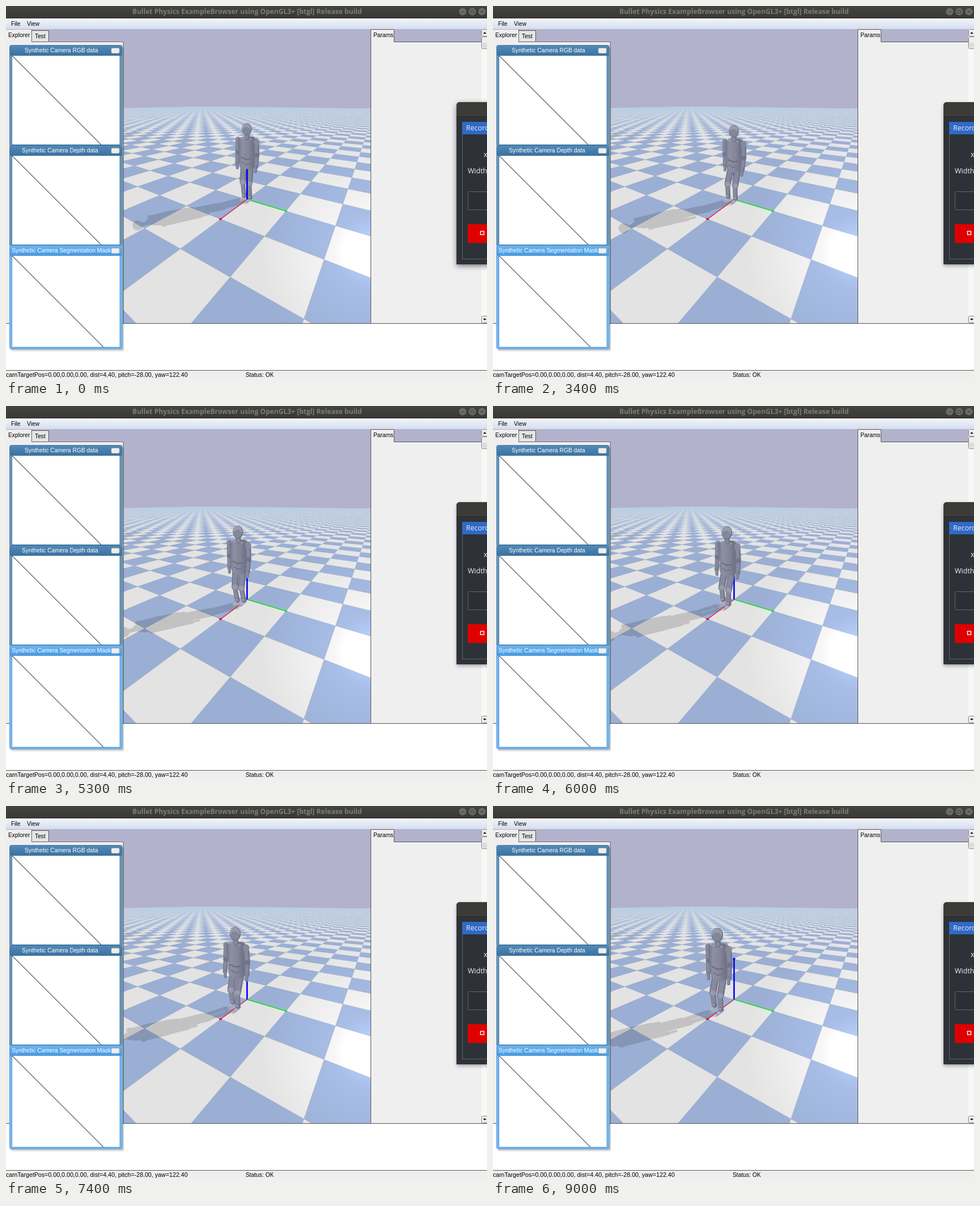
Write an HTML page with a canvas that moves like this. It is 851 px wide and 658 px high and loops after 10 s.

```html
<!DOCTYPE html>
<html lang="en">
<head>
<meta charset="utf-8">
<title>Walking robot</title>
<style>
html, body { margin: 0; width: 100%; height: 100%; overflow: hidden; background: #fff; }
#stage { position: relative; width: 851px; height: 658px; overflow: hidden; }
canvas, svg { position: absolute; left: 0; top: 0; display: block; }
svg text { font: 10.3px "Liberation Sans", Arial, sans-serif; fill: #000; white-space: pre; }
svg .light { fill: #fff; }
svg .title { font: bold 12.1px "Open Sans", "Noto Sans", sans-serif; fill: #807d77; }
#rec { position: absolute; left: 797px; top: 170px; width: 90px; height: 287px; border-radius: 6px 6px 0 0; background: #2e3238; }
#rec svg text { font: 12.5px "Open Sans", "Noto Sans", sans-serif; fill: #eee; }
</style>
</head>
<body>
<div id="stage">
<canvas id="view" width="851" height="658"></canvas>
<svg width="851" height="658">
  <defs>
    <linearGradient id="menu" x2="0" y2="1"><stop stop-color="#f2f5fc"/><stop offset="1" stop-color="#d5dcec"/></linearGradient>
    <linearGradient id="bar" x2="0" y2="1"><stop stop-color="#44433e"/><stop offset="1" stop-color="#393834"/></linearGradient>
    <linearGradient id="dim" x2="0" y2="1"><stop stop-color="#5189b9"/><stop offset="1" stop-color="#3b719f"/></linearGradient>
    <linearGradient id="lit" x2="0" y2="1"><stop stop-color="#6db3ef"/><stop offset="1" stop-color="#4798df"/></linearGradient>
  </defs>
  <rect width="851" height="22" fill="url(#bar)"/>
  <text class="title" x="426.5" y="14" text-anchor="middle">Bullet Physics ExampleBrowser using OpenGL3+ [btgl] Release build</text>
  <g fill="#6d6b66"><circle cx="808" cy="10" r="6.5"/><circle cx="825" cy="10" r="6.5"/><circle cx="842" cy="10" r="6.5"/></g>
  <path d="M805 10.5h6M822.5 7.5h5v5h-5zM839.5 7.5l5 5m0-5l-5 5" fill="none" stroke="#3c3b37"/>
  <rect y="22" width="851" height="19" fill="url(#menu)"/>
  <text x="9" y="35">File</text><text x="37" y="35">View</text>

  <path d="M0 41h45v22h163v498H0z" fill="#eee"/>
  <path d="M45.5 62.5v-19h30v19" fill="#e6e6e6" stroke="#555"/>
  <path d="M0 41.5h45.5v22h162v497" fill="none" stroke="#666"/>
  <path d="M1 42h44M46 64.5h160" stroke="#fff"/>
  <text x="4" y="55">Explorer</text><text x="51" y="57">Test</text>

  <path d="M645 41h41v22h155v498H645z" fill="#efefef"/>
  <path d="M645.5 561V41.5h41v22h155" fill="none" stroke="#555"/>
  <text x="650" y="55">Params</text>
  <rect x="841" y="41" width="10" height="520" fill="#f8f8f8"/>
  <g fill="#eee" stroke="#888"><rect x="841.5" y="41.5" width="12" height="12" rx="2"/><rect x="841.5" y="54.5" width="12" height="21" rx="2"/><rect x="841.5" y="548.5" width="12" height="12" rx="2"/></g>
  <path d="M844 49h6l-3-3zM844 553h6l-3 3z"/>
  <rect x="843" y="65" width="8" height="9" fill="#ddd"/>

  <rect y="561" width="851" height="83" fill="#fff"/>
  <path d="M0 561.5h851" stroke="#555"/>
  <rect y="644" width="851" height="14" fill="#eee"/>
  <path d="M0 644.5h851" stroke="#555"/>
  <text x="0" y="656" style="font-size:10.7px">camTargetPos=0.00,0.00,0.00, dist=4.40, pitch=-28.00, yaw=122.40</text>
  <text x="424" y="656">Status: OK</text>

  <rect x="9" y="73" width="200" height="538" rx="3" fill="#000" opacity=".1"/>
  <rect x="8" y="72" width="200" height="537" rx="3" fill="#000" opacity=".12"/>
  <g id="panels"></g>
</svg>
<div id="rec"><svg width="90" height="287">
  <path d="M0 25V6q0-6 6-6h84v25z" fill="#3c3b37"/>
  <path d="M0 25.5h90" stroke="#25282c"/>
  <path d="M10.5 36v241.5H90" fill="none" stroke="#62666c"/>
  <rect x="10" y="35" width="80" height="22" fill="#2f6ac6"/>
  <text x="17" y="50">Recorder</text><text x="48" y="97">x</text><text x="20" y="126">Width</text>
  <rect x="20.5" y="158.5" width="80" height="32" rx="2" fill="#2b2f35" stroke="#62666c"/>
  <rect x="20" y="216" width="70" height="33" fill="#e00000"/>
  <rect x="42.5" y="228.5" width="6" height="6" fill="none" stroke="#fff" stroke-width="1.4"/>
</svg></div>
</div>
<script>
const W = 851, H = 658, LOOP = 10000;
const view = document.getElementById('view').getContext('2d');
const rec = document.getElementById('rec');

const panels = [
  ['Synthetic Camera RGB data', 33, 69, 157, 'dim', '#41779f', '#6c9abf'],
  ['Synthetic Camera Depth data', 28, 246, 157, 'dim', '#41779f', '#6c9abf'],
  ['Synthetic Camera Segmentation Mask', 10, 423, 161, 'lit', '#4b9ce0', '#7cb8ec']
];
document.getElementById('panels').innerHTML = panels.map(([label, x, y, h, fill, edge, frame]) => `
  <rect x="6.5" y="${y + .5}" width="199" height="${h + 22}" rx="3" fill="${frame}" stroke="${edge}"/>
  <rect x="7" y="${y + 1}" width="198" height="18" rx="2" fill="url(#${fill})"/>
  <rect x="10.5" y="${y + 18.5}" width="191" height="${h + 1}" fill="#fff" stroke="${edge}"/>
  <path d="M11 ${y + 19}l${h} ${h}" stroke="#000"/>
  <rect x="186.5" y="${y + 5.5}" width="14" height="9" rx="2" fill="#eee" stroke="#bbb"/>
  <text class="light" x="${x}" y="${y + 13}">${label}</text>`).join('');

// Orbit camera: yaw 122.4, pitch -28, distance 4.4
const rad = Math.PI / 180, F = 320, DIST = 4.4;
const cy = Math.cos(122.4 * rad), sy = Math.sin(122.4 * rad);
const cp = Math.cos(28 * rad), sp = Math.sin(28 * rad);

function project(x, y, z = 0) {
  const side = cy * x + sy * y, near = sy * x - cy * y;
  const k = F / (DIST - cp * near - sp * z);
  return [426.5 + side * k, 342.2 + (sp * near - cp * z) * k, k];
}
const castShadow = (x, y, z) => project(x + 1.25 * z, y - .75 * z, 0);

function layer() {
  const c = document.createElement('canvas');
  c.width = W; c.height = H;
  return c.getContext('2d');
}

function trace(g, pts) {
  pts.forEach((p, i) => i ? g.lineTo(p[0], p[1]) : g.moveTo(p[0], p[1]));
  g.closePath();
}

// Brightens the floor in proportion to its own colour
function glow(g, x, y, r, level) {
  const grad = g.createRadialGradient(x, y, 0, x, y, r);
  grad.addColorStop(0, `rgb(${level},${level},${level})`);
  grad.addColorStop(1, '#000');
  g.globalCompositeOperation = 'color-dodge';
  g.fillStyle = grad;
  g.fillRect(x - r, y - r, 2 * r, 2 * r);
  g.globalCompositeOperation = 'source-over';
}

function makeGround() {
  const g = layer(), N = 100;
  g.fillStyle = '#b2b2cc';
  g.fillRect(0, 0, W, H);
  g.beginPath();
  trace(g, [project(40, -N), project(-N, -N), project(-N, 60), [W * 2, H], [-W, H]]);
  g.fillStyle = '#e3e3e3';
  g.fill();
  g.save();
  g.clip();
  g.fillStyle = '#9bafd5';
  g.strokeStyle = 'rgba(120,125,125,.4)';
  g.lineWidth = .6;
  for (let i = -N; i < 12; i++) {
    g.beginPath();
    for (let j = -N; j < N; j++) {
      if ((i + j) % 2 === 0) continue;
      const q = [project(i, j), project(i + 1, j), project(i + 1, j + 1), project(i, j + 1)];
      if (q.some(p => p[2] < 0 || p[2] > 600)) continue;
      if (q.every(p => p[0] < 208) || q.every(p => p[0] > 645)) continue;
      trace(g, q);
    }
    g.fill();
    if (i > -6) g.stroke();
  }
  const haze = g.createLinearGradient(0, 178, 0, 218);
  haze.addColorStop(0, 'rgba(184,205,224,.95)');
  haze.addColorStop(.35, 'rgba(190,208,226,.5)');
  haze.addColorStop(1, 'rgba(200,214,230,0)');
  g.fillStyle = haze;
  g.fillRect(0, 170, W, 60);
  glow(g, 645, 435, 200, 30);
  glow(g, 645, 435, 65, 24);
  g.restore();
  return g.canvas;
}

function axis(g, from, to, color, width, cap) {
  const a = project(...from), b = project(...to);
  g.strokeStyle = g.fillStyle = color;
  g.lineWidth = width;
  g.lineCap = 'butt';
  g.beginPath();
  g.moveTo(a[0], a[1]);
  g.lineTo(b[0], b[1]);
  g.stroke();
  if (cap) g.fillRect(b[0] - cap / 2, b[1] - 1.5, cap, 3);
}

// Planted foot, then a smooth swing over half of each gait cycle
const STRIDE = .145, CYCLE = 1.45;
function footAt(u, s) {
  const n = Math.floor(u), f = u - n;
  const w = Math.min(1, Math.max(0, (f - .25) * 2));
  const g = w * w * (3 - 2 * w);
  return { step: n + g, lift: .045 * Math.sin(Math.PI * w) * Math.min(1, s * 3) };
}

function poseAt(s) {
  const u = (s - .7) / CYCLE, ramp = Math.min(1, s * 2);
  const right = footAt(u + .5, s), left = footAt(u + 1, s);
  return {
    x: .1 * s,
    y: ramp * (.025 + .05 * Math.cos(2 * Math.PI * u)),
    drop: .025 * ramp,
    swing: ramp * .025 * Math.sin(2 * Math.PI * u),
    right: { x: STRIDE * right.step, lift: right.lift },
    left: { x: Math.max(0, STRIDE * (left.step - .5)), lift: left.lift }
  };
}

const DARK = '#727589', MID = '#878a9e', LIGHT = '#999bad';
const half = [[.08, 1.46], [.19, 1.41], [.19, 1.18], [.155, 1.03], [.175, .95], [.16, .82], [.04, .76]];
const outline = [...half, ...half.map(([y, z]) => [-y, z]).reverse()];

function drawRobot(g, p, proj, flat) {
  const at = (x, y, z) => proj(p.x + x, p.y + y, z - p.drop);
  const floor = (x, y, z) => proj(x, y, z);
  const thin = flat ? .75 : 1;
  g.lineCap = g.lineJoin = 'round';

  function line(pts, w, color, shift = 0) {
    g.strokeStyle = flat ? '#000' : color;
    g.lineWidth = w * pts[0][2] * thin;
    g.beginPath();
    pts.forEach((q, i) => g[i ? 'lineTo' : 'moveTo'](q[0] + shift, q[1]));
    g.stroke();
  }
  function limb(a, b, w) {
    line([a, b], w, DARK);
    if (!flat) line([a, b], w * .65, MID, -.6);
  }
  function ball(q, rx, ry, color) {
    g.fillStyle = flat ? '#000' : color;
    g.beginPath();
    g.ellipse(q[0], q[1], rx * q[2], ry * q[2] * thin, 0, 0, 7);
    g.fill();
  }
  function arm(d) {
    const k = d * p.swing;
    const shoulder = at(0, d * .225, 1.38), elbow = at(k, d * .245, 1.11);
    const wrist = at(.03 + 2 * k, d * .245, .87), hand = at(.04 + 2 * k, d * .24, .76);
    limb(shoulder, elbow, .1);
    limb(elbow, wrist, .09);
    limb(wrist, hand, .06);
    ball(shoulder, .06, .065, MID);
    ball(elbow, .045, .045, DARK);
  }
  function leg(d, foot) {
    const fx = foot.x, fy = d * .085, fz = .085 + foot.lift;
    const hx = p.x, hy = p.y + d * .09, hz = .82 - p.drop;
    const len = Math.hypot(fx - hx, fy - hy, hz - fz);
    const bend = Math.sqrt(Math.max(0, .385 ** 2 - len * len / 4)) * .4;
    const hip = floor(hx, hy, hz), ankle = floor(fx, fy, fz);
    const knee = floor((fx + hx) / 2 + bend, (fy + hy) / 2, (hz + fz) / 2);
    line([floor(fx - .05, fy, fz - .05), floor(fx + .13, fy, fz - .06)], .075, '#a3a5b3');
    line([floor(fx - .03, fy, fz - .035), floor(fx + .1, fy, fz - .04)], .05, '#b4b6c1');
    limb(hip, knee, .14);
    limb(knee, ankle, .105);
    ball(knee, .06, .055, LIGHT);
    ball(ankle, .055, .05, DARK);
    ball(floor(fx + .03, fy, fz + .02), .03, .03, LIGHT);
  }
  function torso(x, color) {
    g.beginPath();
    trace(g, outline.map(([y, z]) => at(x, y, z)));
    g.fillStyle = flat ? '#000' : color;
    g.fill();
  }

  line([at(-.13, .06, 1.4), at(-.13, .15, 1.25)], .12, LIGHT);
  arm(-1);
  leg(-1, p.right);
  leg(1, p.left);
  torso(-.07, DARK);
  let skin = MID;
  if (!flat) {
    const a = at(.05, -.19, 1.2), b = at(.05, .19, 1.2);
    skin = g.createLinearGradient(a[0], 0, b[0], 0);
    skin.addColorStop(0, DARK);
    skin.addColorStop(.25, '#8d90a3');
    skin.addColorStop(.7, '#828598');
    skin.addColorStop(1, '#6f7286');
  }
  torso(.05, skin);
  if (!flat) {
    line([at(.05, -.12, 1.03), at(.05, 0, 1.0), at(.05, .12, 1.03)], .02, '#64677b');
    line([at(.05, -.1, .92), at(.05, 0, .88), at(.05, .1, .92)], .015, '#6a6d81');
    line([at(.05, -.13, 1.43), at(.05, .13, 1.43)], .025, LIGHT);
  }
  arm(1);
  limb(at(0, 0, 1.44), at(.01, 0, 1.54), .1);
  const head = at(.01, 0, 1.605);
  ball(head, .1, .125, DARK);
  if (!flat) {
    ball([head[0] - .6, head[1] - 2, head[2]], .088, .097, LIGHT);
    ball([head[0] - .8, head[1] + 3, head[2]], .078, .075, '#84879a');
  }
}

const ground = makeGround(), shade = layer();

function drawScene(s) {
  const pose = poseAt(s);
  shade.clearRect(0, 0, W, H);
  drawRobot(shade, pose, castShadow, true);
  view.drawImage(ground, 0, 0);
  view.globalAlpha = .14;
  view.drawImage(shade.canvas, 0, 0);
  view.globalAlpha = 1;
  const o = [0, 0, 0];
  axis(view, o, [1, 0, 0], '#e8102a', 1.3, 5);
  axis(view, o, [0, 1, 0], '#14e21c', 1.6, 4);
  axis(view, o, [0, 0, 1], '#0000f0', 2.6, 4);
  drawRobot(view, pose, project, false);
  if (pose.x < .07) axis(view, o, [0, 0, .77], '#0000f0', 2.6);
}

let last = -1;
function tick() {
  const step = Math.floor(performance.now() % LOOP / 100);
  if (step !== last) {
    last = step;
    drawScene(Math.min(6.5, Math.max(0, step / 10 - 2.5)));
    const blur = step < 11 ? 10 : step < 12 ? 8 : 6;
    rec.style.boxShadow = `0 3px ${blur}px rgba(0,0,0,${blur / 20})`;
  }
  requestAnimationFrame(tick);
}
tick();
</script>
</body>
</html>
```
